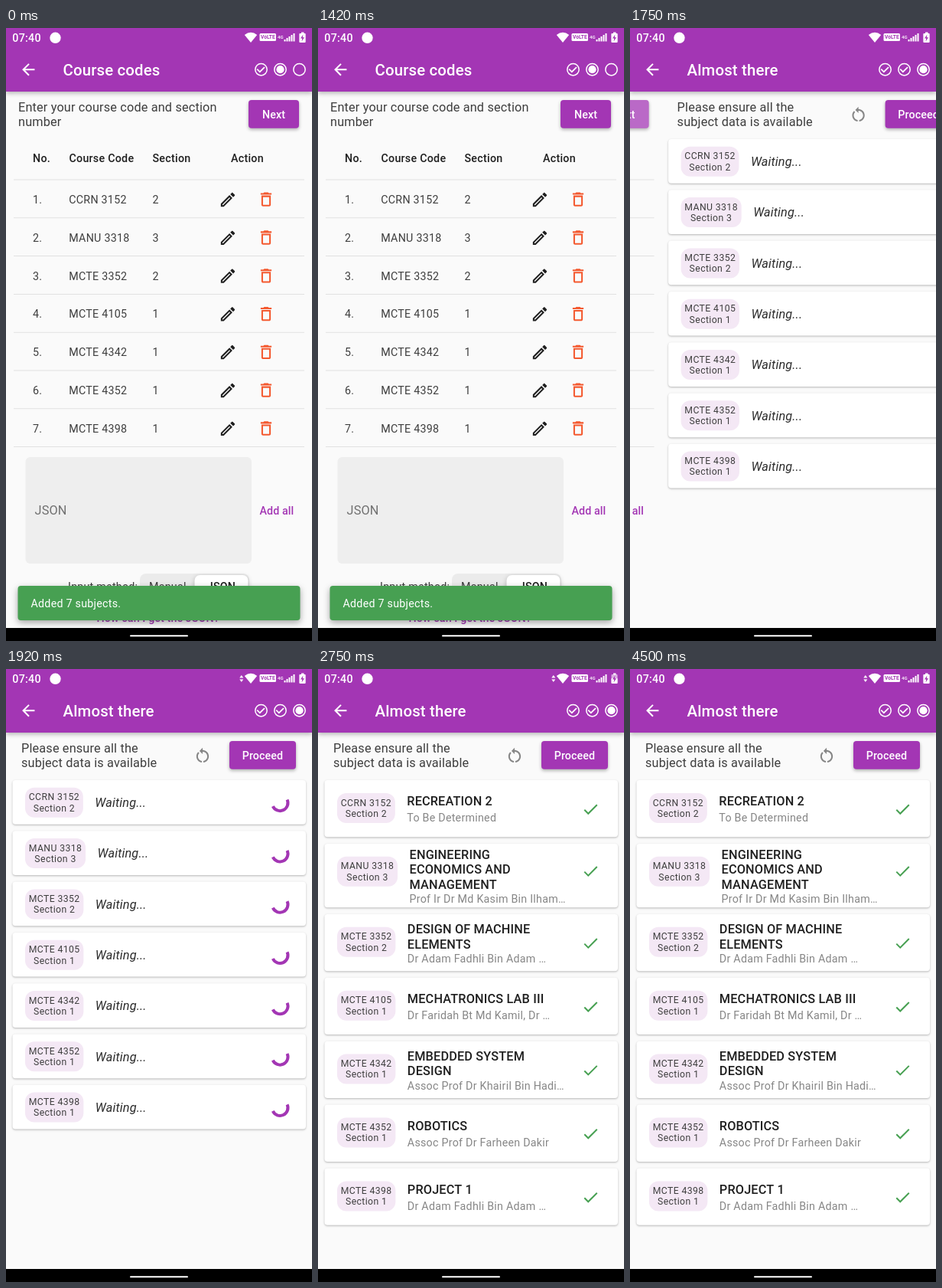
These frames come from a looping animation (400x800 px, 4830 ms). An HTML page with a canvas:

```html
<!DOCTYPE html>
<html lang="en">
<head>
<meta charset="utf-8">
<title>Course codes</title>
<style>
  html, body { margin: 0; width: 100%; height: 100%; overflow: hidden; background: #fafafa; }
  canvas { display: block; width: 400px; height: 800px; }
</style>
</head>
<body>
<canvas id="stage"></canvas>
<script>
const W = 400, H = 800, LOOP = 4830, STEP = 1000 / 12;
const DP = 1.0185; // stage pixels per layout unit
const PURPLE = '#a336b4', GREEN = '#47a052', ORANGE = '#f4592f', PAPER = '#fafafa';
const INK = '#3e3e3e', DARK = '#1f1f1f', GREY = '#868686';

const SLIDE_START = 1580, SLIDE_TIME = 212.5, SPIN_START = 1635;

const canvas = document.getElementById('stage');
const ctx = canvas.getContext('2d');
const ratio = window.devicePixelRatio || 1;
canvas.width = W * ratio;
canvas.height = H * ratio;

const ICONS = {
  back: 'M20 11H7.83l5.59-5.59L12 4l-8 8 8 8 1.41-1.41L7.83 13H20z',
  edit: 'M14.06 9.02l.92.92L5.92 19H5v-.92zM17.66 3c-.25 0-.51.1-.7.29l-1.83 1.83 3.75 3.75 1.83-1.83c.39-.39.39-1.02 0-1.41l-2.34-2.34c-.2-.2-.45-.29-.71-.29zM14.06 6.19L3 17.25V21h3.75L17.81 9.94z',
  bin: 'M6 19c0 1.1.9 2 2 2h8c1.1 0 2-.9 2-2V7H6zM8 9h8v10H8zM15.5 4l-1-1h-5l-1 1H5v2h14V4z',
  tick: 'M9 16.17L4.83 12l-1.42 1.41L9 19 21 7l-1.41-1.41z',
  ringTick: 'M16.59 7.58L10 14.17l-3.59-3.58L5 12l5 5 8-8z',
  restart: 'M12 5V2L8 6l4 4V7c3.31 0 6 2.69 6 6 0 2.97-2.17 5.43-5 5.91v2.02c3.95-.49 7-3.85 7-7.93 0-4.42-3.58-8-8-8zM6 13c0-1.65.67-3.15 1.76-4.24L6.34 7.34C4.9 8.79 4 10.79 4 13c0 4.08 3.05 7.44 7 7.93v-2.02c-2.83-.48-5-2.94-5-5.91z'
};
for (const name in ICONS) ICONS[name] = new Path2D(ICONS[name]);

// ready: time at which the subject's details arrive
const SUBJECTS = [
  { code: 'CCRN 3152', section: 2, title: ['RECREATION 2'], staff: 'To Be Determined', ready: 2080 },
  { code: 'MANU 3318', section: 3, title: ['ENGINEERING', 'ECONOMICS AND', 'MANAGEMENT'],
    staff: 'Prof Ir Dr Md Kasim Bin Ilham…', ready: 2330 },
  { code: 'MCTE 3352', section: 2, title: ['DESIGN OF MACHINE', 'ELEMENTS'],
    staff: 'Dr Adam Fadhli Bin Adam …', ready: 2170 },
  { code: 'MCTE 4105', section: 1, title: ['MECHATRONICS LAB III'],
    staff: 'Dr Faridah Bt Md Kamil, Dr …', ready: 2080 },
  { code: 'MCTE 4342', section: 1, title: ['EMBEDDED SYSTEM', 'DESIGN'],
    staff: 'Assoc Prof Dr Khairil Bin Hadi…', ready: 2250 },
  { code: 'MCTE 4352', section: 1, title: ['ROBOTICS'], staff: 'Assoc Prof Dr Farheen Dakir', ready: 2080 },
  { code: 'MCTE 4398', section: 1, title: ['PROJECT 1'], staff: 'Dr Adam Fadhli Bin Adam …', ready: 2080 }
];

// Card metrics by number of title lines (0 = still waiting)
const CARD = [
  { pitch: 66.3, mid: 29.3 },
  { pitch: 82.9, mid: 36.4, title: 27.6, staff: 49.4, tick: 38 },
  { pitch: 82.9, mid: 36.4, title: 19.3, staff: 58, tick: 38 },
  { pitch: 92, mid: 36.4, title: 14, staff: 72, tick: 36 }
];

const clamp = (v) => Math.min(1, Math.max(0, v));
const smooth = (p) => p * p * (3 - 2 * p);

// Cubic curve (0.4, 0) (0.2, 1)
function fastOutSlowIn(x) {
  let lo = 0, hi = 1;
  for (let i = 0; i < 20; i++) {
    const s = (lo + hi) / 2, r = 1 - s;
    if (1.2 * r * r * s + 0.6 * r * s * s + s * s * s < x) lo = s; else hi = s;
  }
  return smooth(lo);
}

function setFont(size, weight, spacing) {
  ctx.font = `${weight} ${size * DP}px Roboto, sans-serif`;
  ctx.letterSpacing = `${spacing * DP}px`;
}

// y is the middle of the capital letters
function text(str, x, y, { size = 14, weight = '400', spacing = 0.25, color = INK, align = 'left' } = {}) {
  setFont(size, weight, spacing);
  ctx.fillStyle = color;
  ctx.textAlign = align;
  ctx.fillText(str, x, y + size * DP * 0.356);
}

function box(x, y, w, h, r, color) {
  ctx.fillStyle = color;
  ctx.beginPath();
  ctx.roundRect(x, y, w, h, r);
  ctx.fill();
}

function raised(x, y, w, h, r, color, blur, drop, alpha) {
  ctx.save();
  ctx.shadowColor = `rgba(0,0,0,${alpha})`;
  ctx.shadowBlur = blur * ratio;
  ctx.shadowOffsetY = drop * ratio;
  box(x, y, w, h, r, color);
  ctx.restore();
}

function disc(x, y, r, color) {
  ctx.fillStyle = color;
  ctx.beginPath();
  ctx.arc(x, y, r, 0, Math.PI * 2);
  ctx.fill();
}

function arc(x, y, r, width, color, from = 0, to = Math.PI * 2) {
  ctx.strokeStyle = color;
  ctx.lineWidth = width;
  ctx.beginPath();
  ctx.arc(x, y, r, from, to);
  ctx.stroke();
}

function shape(points, color) {
  ctx.fillStyle = color;
  ctx.beginPath();
  points.forEach(([x, y]) => ctx.lineTo(x, y));
  ctx.fill();
}

function icon(name, x, y, color, size = 24 * DP) {
  ctx.save();
  ctx.translate(x - size / 2, y - size / 2);
  ctx.scale(size / 24, size / 24);
  ctx.fillStyle = color;
  ctx.fill(ICONS[name], 'evenodd');
  ctx.restore();
}

function button(label, x, w) {
  raised(x, 94, w, 36.7, 4, PURPLE, 4, 2, 0.3);
  text(label, x + w / 2, 112.8, { weight: '500', spacing: 0.1, color: '#fff', align: 'center' });
}

function intro(lines, x) {
  lines.forEach((line, i) => text(line, x, 102.7 + i * 19.1, { size: 16, spacing: 0.15 }));
}

function ripple(t) {
  if (t < SLIDE_START) return;
  ctx.save();
  ctx.beginPath();
  ctx.roundRect(317, 94, 66, 36.7, 4);
  ctx.clip();
  disc(345, 105, 11 + (t - SLIDE_START) * 0.35, 'rgba(255,255,255,.25)');
  ctx.restore();
}

function codesPage(t) {
  intro(['Enter your course code and section', 'number'], 16);
  button('Next', 317, 66);
  ripple(t);

  const head = { weight: '500', color: DARK };
  [['No.', 35], ['Course Code', 82.5], ['Section', 191.5], ['Action', 294]]
    .forEach(([label, x]) => text(label, x, 170.3, head));
  for (let i = 0; i <= SUBJECTS.length; i++) box(10, 197.5 + i * 49.8, 380, 1, 0, '#e1e1e1');
  SUBJECTS.forEach((s, i) => {
    const y = 224 + i * 49.8;
    text(`${i + 1}.`, 35, y);
    text(s.code, 82.3, y);
    text(s.section, 191.5, y);
    icon('edit', 290, y, DARK);
    icon('bin', 340, y - 0.3, ORANGE);
  });

  box(25.5, 560, 295.5, 139, 6, '#eeeeee');
  text('JSON', 37.5, 629, { size: 16, spacing: 0.15, color: '#717171' });
  const link = { weight: '500', spacing: 0.1, color: PURPLE };
  text('Add all', 331.5, 630, link);

  text('Input method:', 81, 728.7);
  box(175, 712, 143, 33, 8, '#ebebeb');
  raised(246.5, 714, 70, 29, 7, '#fff', 6, 2, 0.25);
  text('Manual', 187, 729);
  text('JSON', 281.5, 729, { weight: '500', color: DARK, align: 'center' });
  text('How can I get the JSON?', 118.5, 770, link);
}

function snackbar(t) {
  const alpha = 1 - clamp((t - 1440) / 80);
  if (!alpha) return;
  ctx.save();
  ctx.globalAlpha = alpha;
  raised(15.5, 728, 369, 45, 4, GREEN, 8, 3, 0.35);
  text('Added 7 subjects.', 32.5, 751, { color: '#fff' });
  ctx.restore();
}

function spinner(x, y, t) {
  const age = t - SPIN_START;
  if (age < 0) return;
  const phase = (age / 1333) % 1;
  const head = fastOutSlowIn(clamp(phase * 2));
  const tail = fastOutSlowIn(clamp(phase * 2 - 1));
  const from = Math.PI * (-0.5 + tail * 1.5 + age / 1111 + phase * 0.5);
  arc(x, y, 10.3, 4, PURPLE, from, from + Math.max((head - tail) * 1.5 * Math.PI, 0.001));
}

function card(s, y, t) {
  const ready = t >= s.ready;
  const m = CARD[ready ? s.title.length : 0];
  const mid = y + m.mid;
  raised(8.5, y, 383.5, m.pitch - 8.6, 4, '#fff', 2.5, 1, 0.28);

  setFont(12, '400', 0.4);
  const w = ctx.measureText(s.code).width + 9.5;
  box(25, mid - 19.5, w, 39, 12, '#f4e8f5');
  const small = { size: 12, spacing: 0.4, align: 'center' };
  text(s.code, 25 + w / 2, mid - 7.2, small);
  text(`Section ${s.section}`, 25 + w / 2, mid + 7, small);

  const x = 25 + w + 15.5;
  if (ready) {
    s.title.forEach((line, i) =>
      text(line, x, y + m.title + i * 19.6, { size: 16, weight: '500', spacing: 0.15, color: DARK }));
    text(s.staff, x, y + m.staff, { color: GREY });
    icon('tick', 356.3, y + m.tick, GREEN);
  } else {
    text('Waiting...', x, mid, { size: 16, weight: 'italic 400', spacing: 0.15, color: '#2c2c2c' });
    spinner(358.2, mid + 0.5, t);
  }
  return y + m.pitch;
}

function statusPage(t) {
  intro(['Please ensure all the', 'subject data is available'], 20);
  icon('restart', 257, 113, GREY);
  button('Proceed', 292, 87);
  SUBJECTS.reduce((y, s) => card(s, y, t), 145);
}

function battery(t) {
  const top = t < 2500 || t >= 4500 ? 7 : t >= 4420 ? 9 : 12;
  box(386, 5.5, 3.5, 2, 0, '#fff');
  box(383.5, 7, 8, 12, 1, 'rgba(255,255,255,.6)');
  box(383.5, top, 8, 19 - top, 1, '#fff');
  shape([[388.4, 8.5], [385, 13.6], [387.2, 13.6], [386.6, 17.5], [390, 12.2], [387.8, 12.2]], PURPLE);
}

function statusBar(t) {
  text('07:40', 8.3, 12.8, { weight: '500', color: '#fff' });
  disc(64.5, 12.8, 7.2, '#fff');
  if (t >= 1830) {
    shape([[305.3, 11.5], [307.8, 8], [310.3, 11.5]], '#fff');
    shape([[305.3, 13.5], [307.8, 17], [310.3, 13.5]], '#fff');
  }
  ctx.fillStyle = '#fff';
  ctx.beginPath();
  ctx.moveTo(320, 19);
  ctx.lineTo(311.8, 9);
  ctx.quadraticCurveTo(320, 2.6, 328.2, 9);
  ctx.fill();
  box(331.5, 7, 21.5, 10, 1.5, '#fff');
  text('VoLTE', 342.3, 12, { size: 6.5, weight: '700', spacing: 0, color: PURPLE, align: 'center' });
  text('4G', 355, 12, { size: 6, weight: '500', spacing: 0, color: '#fff' });
  for (let i = 0; i < 5; i++) {
    const h = 2.5 + i * 2;
    box(363.5 + i * 3, 17.5 - h, 2, h, 0, '#fff');
  }
  battery(t);
}

function header(t, second) {
  raised(0, -10, W, 93, 0, PURPLE, 6, 2, 0.3);
  statusBar(t);
  icon('back', 29.3, 54.3, '#fff');
  text(second ? 'Almost there' : 'Course codes', 74.5, 54.5,
    { size: 20, weight: '500', spacing: 0.15, color: '#fff' });
  const current = second ? 2 : 1;
  for (let i = 0; i < 3; i++) {
    const x = 333.5 + i * 25;
    arc(x, 54.2, 7.7, 1.5, '#fff');
    if (i < current) icon('ringTick', x, 54.2, '#fff', 20 * DP);
    if (i === current) disc(x, 54.2, 5.1, '#fff');
  }
}

function draw(t) {
  ctx.setTransform(ratio, 0, 0, ratio, 0, 0);
  box(0, 0, W, H, 0, PAPER);

  const slide = smooth(clamp((t - SLIDE_START) / SLIDE_TIME));
  ctx.save();
  ctx.translate(-slide * W, 0);
  if (slide < 1) codesPage(t);
  ctx.translate(W, 0);
  if (slide > 0) statusPage(t);
  ctx.restore();

  snackbar(t);
  header(t, slide >= 0.5);
  box(0, 783, W, 17, 0, '#000');
  box(162, 792.2, 76, 2, 1, '#fff');
}

function frame() {
  const t = performance.now() % LOOP;
  const step = Math.floor((t + 4) / STEP) % 58;
  draw(Math.round(step * STEP / 10) * 10);
  requestAnimationFrame(frame);
}
frame();
</script>
</body>
</html>
```
